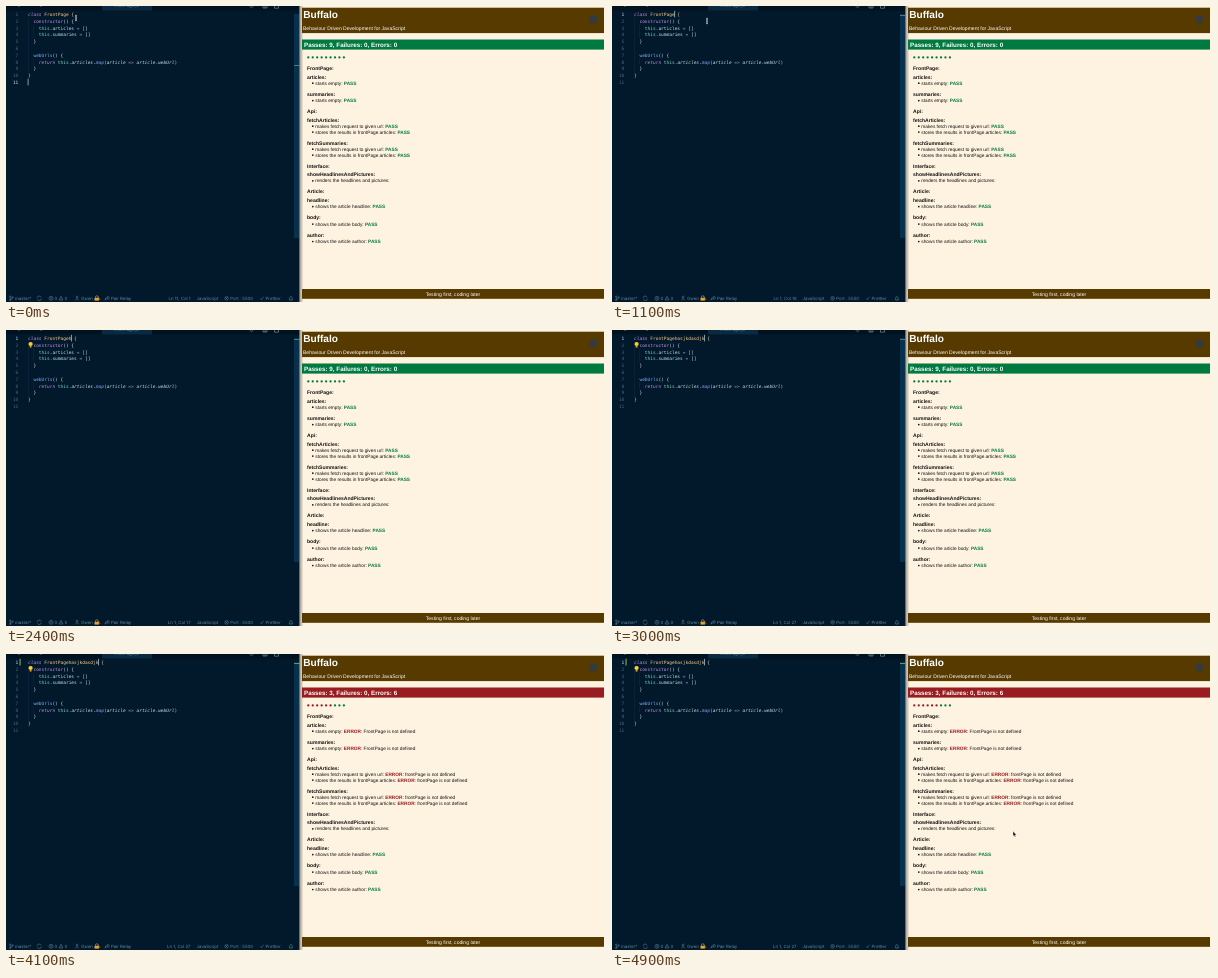
Recreate the animation shown at these times as an HTML page. Size 600 by 296 pixels, loop 5 s.

```html
<!DOCTYPE html>
<html lang="en">
<head>
<meta charset="utf-8">
<title>Editor and test runner</title>
<style>
  html, body { margin: 0; width: 100%; height: 100%; overflow: hidden; background: #01192b; }
  svg { display: block; width: 600px; height: 296px; }
  text { white-space: pre; text-rendering: geometricPrecision; }
  .code { font: 4.5px "DejaVu Sans Mono", monospace; }
  .bar { font: 4.35px Inter, "Open Sans", sans-serif; fill: #6589a3; }
  .page { font-family: "Liberation Sans", Arial, sans-serif; }
  .icon { fill: none; stroke: #6589a3; stroke-width: .5; }
  .b { font-weight: bold; }
  .i { font-style: italic; }
</style>
</head>
<body>
<svg id="stage" viewBox="0 0 600 296">
  <defs>
    <linearGradient id="shade">
      <stop offset="0" stop-color="#000" stop-opacity=".38"/>
      <stop offset="1" stop-color="#000" stop-opacity="0"/>
    </linearGradient>
  </defs>
</svg>
<script>
const LOOP = 5000, STEP = 100;
const CHAR = 4.5 * 0.602, LEFT = 22, LINE = 6.8;
const TYPED = "hasjkdasdjk";
const CLICK = 800, HINT = 1400, TYPE = 2400, TYPE_END = 2900, SAVE = 3400, RELOAD = 3900, WAKE = 4300;
const GREEN = "#007a40", RED = "#981c20", BROWN = "#563a00";
const stage = document.getElementById("stage");

function add(tag, attrs = {}, parent = stage, content) {
  const el = document.createElementNS("http://www.w3.org/2000/svg", tag);
  for (const k in attrs) el.setAttribute(k, attrs[k]);
  if (content !== undefined) el.textContent = content;
  parent.appendChild(el);
  return el;
}
const rect = (x, y, width, height, fill, parent) => add("rect", { x, y, width, height, fill }, parent);
const dot = (cx, cy, r, fill, parent) => add("circle", { cx, cy, r, fill }, parent);
const path = (d, attrs = {}, parent) => add("path", { d, class: "icon", ...attrs }, parent);
const label = (x, y, s, cls, attrs = {}, parent) => add("text", { x, y, class: cls, ...attrs }, parent, s);
const show = (el, on) => el.setAttribute("visibility", on ? "visible" : "hidden");
const lineY = n => 10 + (n - 1) * LINE;

// Editor frame
rect(0, 0, 294, 296, "#01192b");
rect(0, 0, 294, 4.5, "#011220");
rect(96, 0, 50, 4.5, "#0a2a42");
label(12, 1.2, "x", "bar");
label(34, 1.2, "x", "bar");
label(108, 1.3, "frontPage.js", "bar", { fill: "#a9c0d2" });
path("M243.5 0l2 1.6l2-1.6M257 0v2h4v-2M259 0v2M268.5 0v2.2h4v-2.2", { style: "stroke:#9fb4c4" });
rect(288, 8, 5.5, 224, "#07314d");

// Indent guides
rect(22.1, lineY(2) - 5.2, .35, LINE * 8, "#17364d");
rect(LEFT + CHAR * 2, lineY(3) - 5.2, .35, LINE * 2, "#17364d");
rect(LEFT + CHAR * 2, lineY(8) - 5.2, .35, LINE, "#17364d");

const mark = rect(37.4, 4.6, CHAR * 9 + .6, 6.8, "#4a3540");

// Code: style key followed by text
const INK = { k: "#c792ea", n: "#ffcb8b", p: "#d6deeb", f: "#82aaff", t: "#7fdbca", v: "#c5e4e8" };
const CODE = [
  ["ki", "class ", "n", "FrontPage", "n", " {"],
  ["k", "  constructor", "p", "() {"],
  ["t", "    this", "p", ".", "v", "articles ", "k", "= ", "p", "[]"],
  ["t", "    this", "p", ".", "v", "summaries ", "k", "= ", "p", "[]"],
  ["p", "  }"],
  [],
  ["f", "  webUrls", "p", "() {"],
  ["ki", "    return ", "t", "this", "p", ".", "vi", "articles", "p", ".", "fi", "map", "p", "(", "vi", "article ",
   "k", "=> ", "vi", "article", "p", ".", "vi", "webUrl", "p", ")"],
  ["p", "  }"],
  ["n", "}"],
  []
];
let nameSpan;
const numbers = CODE.map((parts, i) => {
  const y = lineY(i + 1);
  const row = label(LEFT, y, "", "code");
  for (let j = 0; j < parts.length; j += 2) {
    const span = add("tspan", { fill: INK[parts[j][0]], class: parts[j][1] || "" }, row, parts[j + 1]);
    if (parts[j + 1] === "FrontPage") nameSpan = span;
  }
  return label(12.3, y, i + 1, "code", { "text-anchor": "end" });
});
const caret = rect(0, 0, .75, 6.6, "#a8cbe4");
const changed = rect(13.6, 4.7, .9, 6.8, "#a8c66c");
const rulerMark = rect(288, 0, 5.5, .8, "#5b8f8a");

const bulb = add("g");
dot(24.6, 14, 2.1, "#ffcb2e", bulb);
rect(23.7, 15.8, 1.8, 1.8, "#d9a514", bulb);

// Status bar
dot(4.2, 290.6, .7, "none").setAttribute("class", "icon");
dot(4.2, 294, .7, "none").setAttribute("class", "icon");
dot(6.6, 291.4, .7, "none").setAttribute("class", "icon");
path("M4.2 291.3v2M6.6 292.1q0 1-2.4 1");
label(9, 294, "master*", "bar");
path("M31.2 292a2 2 0 0 1 3.9-.6M35.3 292.6a2 2 0 0 1-3.9.6");
path("M43 292.3a2 2 0 1 0 4 0a2 2 0 1 0-4 0M44.2 291.5l1.6 1.6M45.8 291.5l-1.6 1.6");
label(48.4, 294, "0", "bar");
path("M53 294l2-3.7l2 3.7zM55 291.6v1.2");
label(58.6, 294, "0", "bar");
path("M70.2 291a.9.9 0 1 0 1.8 0a.9.9 0 1 0-1.8 0M69.6 294.3q1.5-3.8 3 0");
label(75, 294, "Owen", "bar");
path("M89.5 292v-1a1.3 1.3 0 0 1 2.6 0v1", { style: "stroke:#b8bdc2" });
rect(88.5, 291.8, 4.4, 2.8, "#e3a52f");
path("M92 290.8l2 3", { style: "stroke:#d8782f;stroke-width:.8" });
path("M99 294.2q0-3 3-3v-1l1.6 1.7l-1.6 1.6v-1q-2 0-3 1.7");
label(105, 294, "Pair Relay", "bar");
const place = label(184.6, 294, "", "bar", { "text-anchor": "end" });
label(190.6, 294, "JavaScript", "bar");
path("M218.8 292.3a1.8 1.8 0 1 0 3.6 0a1.8 1.8 0 1 0-3.6 0M219.8 291.4l1.6 1.8M221.4 291.4l-1.6 1.8");
label(224.2, 294, "Port : 5500", "bar");
path("M254.2 292.5l1.2 1.3l2-3");
label(259.6, 294, "Prettier", "bar");
path("M283 293.8h3.8q-.8-.7-.7-2a1.2 1.2 0 0 0-2.4 0q.1 1.3-.7 2M284.5 294.5h.8");

// Test report page
rect(293.5, 0, 306.5, 296, "#fef3e0");
rect(293.5, 0, 4, 296, "url(#shade)");
rect(296, 1.7, 302, 25.4, BROWN);
label(297.2, 12.2, "Buffalo", "page b", { "font-size": 10.1, fill: "#fff" });
label(297, 24, "Behaviour Driven Development for JavaScript", "page", { "font-size": 5.05, fill: "#fff" });
dot(587.3, 13.2, 4, "#343b40");
rect(296, 283, 302, 9.8, BROWN);
label(447, 289.5, "Testing first, coding later", "page", { "font-size": 5.05, fill: "#fff", "text-anchor": "middle" });

// [centre y, text, kind]: h heading, c class error, v variable error, o always passes, n no result
const REPORT = [
  [62, "FrontPage:", "h"],
  [71, "articles:", "h"],
  [77, "starts empty:", "c"],
  [88, "summaries:", "h"],
  [94.4, "starts empty:", "c"],
  [105, "Api:", "h"],
  [114, "fetchArticles:", "h"],
  [120, "makes fetch request to given url:", "v"],
  [125.9, "stores the results in frontPage.articles:", "v"],
  [136.8, "fetchSummaries:", "h"],
  [143, "makes fetch request to given url:", "v"],
  [148.9, "stores the results in frontPage.articles:", "v"],
  [159.7, "Interface:", "h"],
  [168.4, "showHeadlinesAndPictures:", "h"],
  [174.6, "renders the headlines and pictures:", "n"],
  [185.3, "Article:", "h"],
  [194, "headline:", "h"],
  [200.4, "shows the article headline:", "o"],
  [211.5, "body:", "h"],
  [217.9, "shows the article body:", "o"],
  [229, "author:", "h"],
  [235.3, "shows the article author:", "o"]
];

function report(failed) {
  const g = add("g");
  rect(296, 33.5, 302, 10.1, failed ? RED : GREEN, g);
  const sum = failed ? "Passes: 3, Failures: 0, Errors: 6" : "Passes: 9, Failures: 0, Errors: 0";
  label(298, 40.7, sum, "page b", { "font-size": 6.25, fill: "#fff" }, g);
  for (let i = 0; i < 9; i++) dot(302.3 + i * 4.45, 51.4, 1.15, failed && i < 6 ? RED : GREEN, g);
  for (const [y, text, kind] of REPORT) {
    if (kind === "h") {
      label(301, y + 1.8, text, "page b", { "font-size": 5.05, fill: "#111" }, g);
      continue;
    }
    dot(306.8, y + .2, .85, "#111", g);
    const row = label(309.3, y + 1.7, text + " ", "page", { "font-size": 4.75, fill: "#111" }, g);
    if (kind === "n") continue;
    const bad = failed && kind !== "o";
    add("tspan", { class: "b", fill: bad ? RED : GREEN }, row, bad ? "ERROR" : "PASS");
    if (bad) add("tspan", {}, row, `: ${kind === "c" ? "F" : "f"}rontPage is not defined`);
  }
  return g;
}
const passing = report(false), failing = report(true);

// Pointer
const beam = add("g");
path("M-1 -2.8q1 0 1 .8v4q0 .8-1 .8M1 -2.8q-1 0-1 .8v4q0 .8 1 .8", { style: "stroke:#dfe8ee;stroke-width:.6" }, beam);
const arrow = path("M0 -2.8v5l1.1-1l.8 1.8l.9-.4l-.8-1.7h1.5z", { style: "fill:#111;stroke:#fff;stroke-width:.4" });

const ROUTE = [
  [0, 70, 12], [500, 64, 10], [CLICK, 64, 9], [1100, 95, 15],
  [1700, 151, 40], [WAKE, 151, 40], [4800, 401, 180], [LOOP, 401, 180]
];
function pointerAt(t) {
  const i = ROUTE.findIndex(p => p[0] > t);
  const [t0, x0, y0] = ROUTE[i - 1], [t1, x1, y1] = ROUTE[i];
  const u = (t - t0) / (t1 - t0), e = u * u * (3 - 2 * u);
  return [x0 + (x1 - x0) * e, y0 + (y1 - y0) * e];
}

function typedAt(t) {
  if (t < TYPE) return 0;
  const u = Math.min(1, (t - TYPE) / (TYPE_END - TYPE));
  return 1 + Math.floor(u * (TYPED.length - 1));
}

function draw(t) {
  const clicked = t >= CLICK, n = typedAt(t);
  const line = clicked ? 1 : 11, col = clicked ? 16 + n : 1;
  nameSpan.textContent = "FrontPage" + TYPED.slice(0, n);
  place.textContent = `Ln ${line}, Col ${col}`;
  numbers.forEach((el, i) => el.setAttribute("fill", i + 1 === line ? "#c5e4fd" : "#4b6479"));

  const since = t >= TYPE_END ? t - TYPE_END : t >= TYPE ? 0 : clicked ? t - CLICK : t;
  caret.setAttribute("x", LEFT + (col - 1) * CHAR - .3);
  caret.setAttribute("y", lineY(line) - 5.2);
  show(caret, since % 1000 < 500);
  rulerMark.setAttribute("y", clicked ? 9 : 59);
  rulerMark.setAttribute("fill", t >= SAVE ? "#7fae62" : "#5b8f8a");
  show(changed, t >= SAVE);
  show(mark, t >= HINT && t < TYPE);
  show(bulb, t >= HINT);
  show(passing, t < RELOAD);
  show(failing, t >= RELOAD);

  const [x, y] = pointerAt(t), awake = t < TYPE || t >= WAKE;
  for (const el of [beam, arrow]) el.setAttribute("transform", `translate(${x} ${y})`);
  show(beam, awake && x < 293);
  show(arrow, awake && x >= 293);
}

const start = performance.now();
function tick() {
  const t = (performance.now() - start) % LOOP;
  draw(Math.floor(t / STEP) * STEP);
  requestAnimationFrame(tick);
}
draw(0);
requestAnimationFrame(tick);
</script>
</body>
</html>
```
